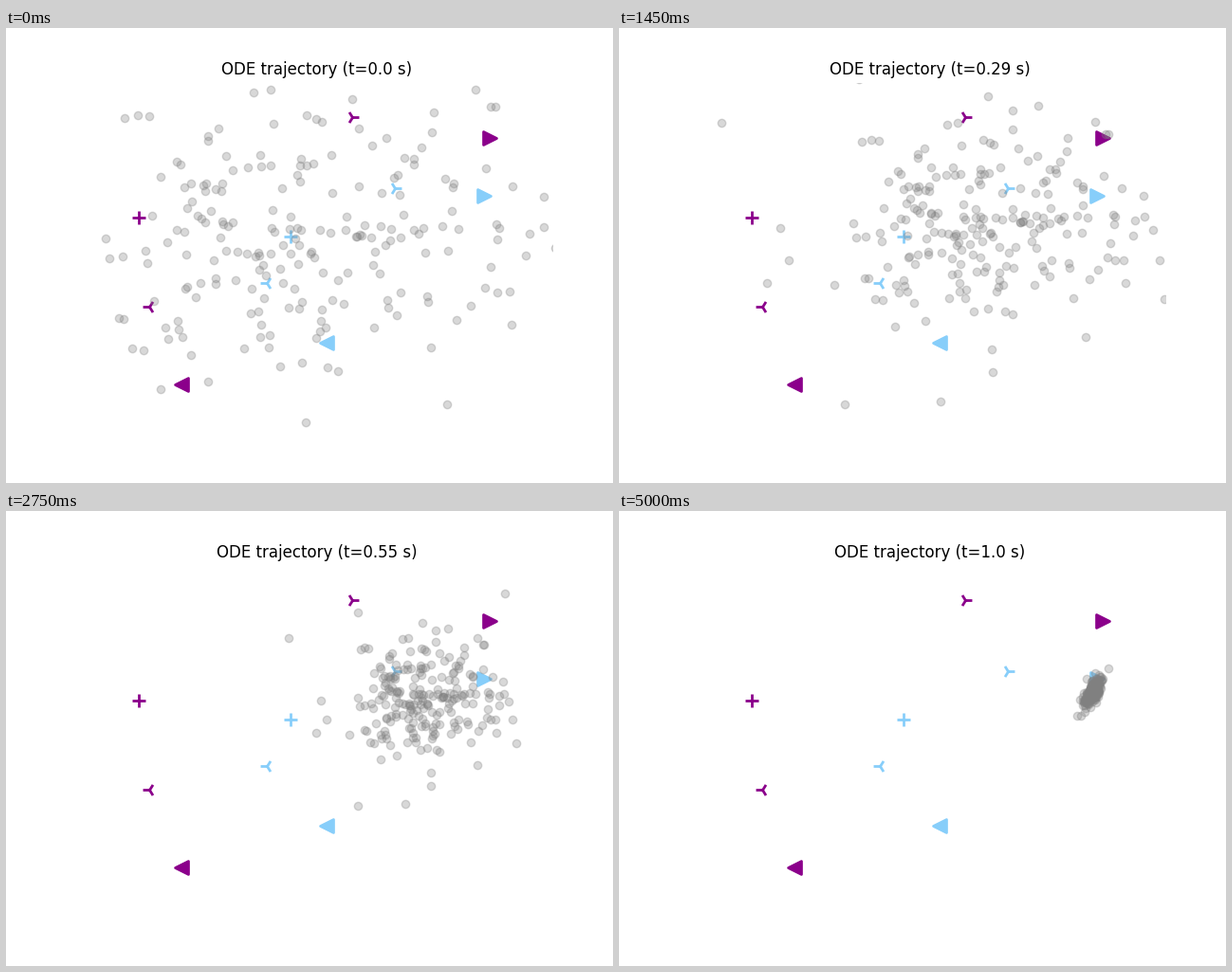
Animation of 640 by 480 pixels, one loop 5.55 s. Source, as a matplotlib script:

```python
import numpy as np
import matplotlib.pyplot as plt
from matplotlib.animation import FuncAnimation

STEPS = 100
FRAMES = 111
INTERVAL = 50
COUNT = 212
HOME = np.array([310, 222])
SPREAD = np.array([125, 86])

# Far-out points that give the cloud its outline.
STRAYS = [
    (-97, 66), (125, -2), (328, 25), (594, -50), (-12, 229), (0, 279),
    (-36, 313), (78, 502), (230, 497), (315, 452), (593, 339), (588, 278),
]

# Marker, then its place for the purple and the blue group.
MARKS = [
    ("+", (140, 200), (300, 220)),
    ("3", (150.5, 293.5), (275, 268.5)),
    ("4", (364.5, 93.5), (410, 168.5)),
    ("<", (184.5, 375.5), (337.5, 331.5)),
    (">", (510, 115.5), (504, 176.5)),
]


def make_cloud():
    """Offsets from HOME: a Gaussian without its tails, plus the strays."""
    rng = np.random.default_rng(4)
    unit = rng.normal(size=(2 * COUNT, 2))
    near = unit[np.hypot(*unit.T) < 2.4][:COUNT]
    return np.vstack([near * SPREAD, np.array(STRAYS) - HOME])


def flow(t):
    """Positions at time t: the cloud drifts right, shrinks and tilts."""
    dx, dy = cloud.T
    center_x = HOME[0] + t * (262 - 73 * t ** 1.7)
    center_y = 191 + 31 * (1 - t) ** 2
    scale_x = 1 - t * (1.21 - 1.03 * (t - 0.52) ** 2)
    scale_y = 1 - t * (1.1 - 0.45 * (t - 0.35) ** 2)
    shear = 0.17 * t - 0.205 * t ** 2
    return center_x + scale_x * dx + shear * dy, center_y + scale_y * dy


cloud = make_cloud()

fig, ax = plt.subplots(figsize=(6.4, 4.8), dpi=100)
ax.set_xlim(80, 576)
ax.set_ylim(427.2, 57.6)
ax.axis("off")

for marker, *places in MARKS:
    for place, color in zip(places, ("darkmagenta", "lightskyblue")):
        ax.scatter(*place, s=100, marker=marker, color=color, linewidth=2)

dots, = ax.plot([], [], "o", color="gray", alpha=0.3, zorder=3)
title = ax.set_title("")


def draw(i):
    t = min(i, STEPS) / STEPS
    dots.set_data(*flow(t))
    title.set_text(f"ODE trajectory (t={round(t, 2)} s)")
    return dots, title


anim = FuncAnimation(fig, draw, frames=FRAMES, interval=INTERVAL,
                     repeat=True, repeat_delay=0)
plt.show()
```
